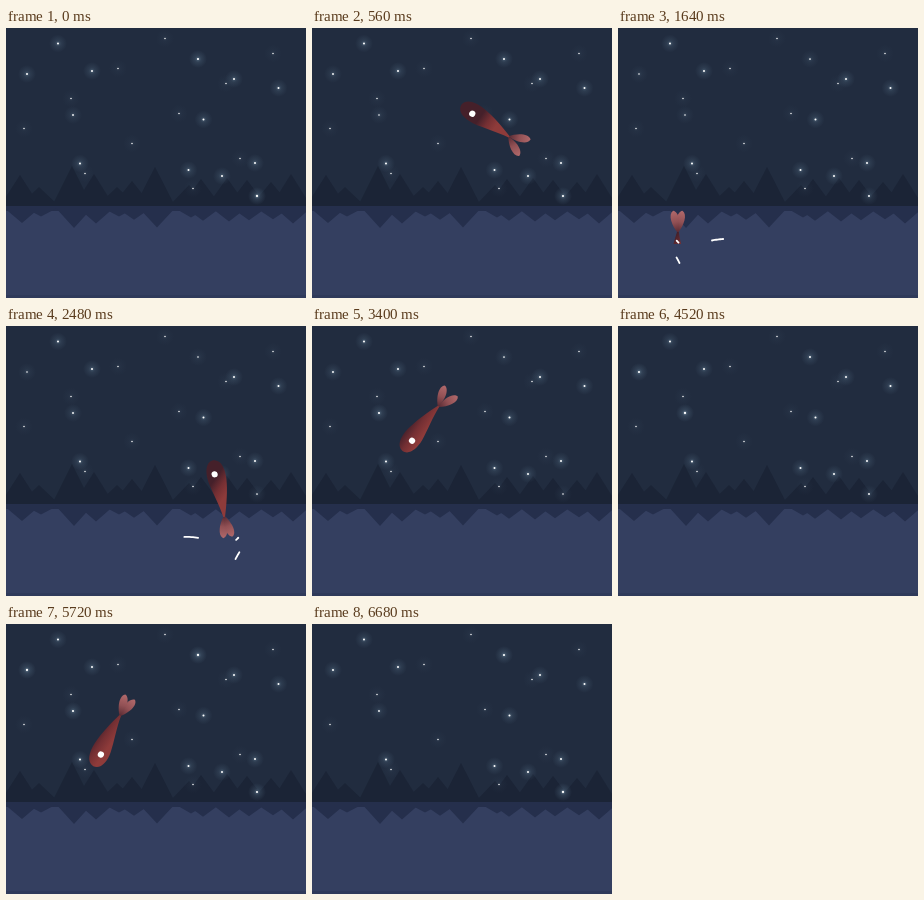
Recreate the animation shown at these times as an HTML page with a canvas. Size 300 by 270 pixels, loop 6.72 s.

```html
<!DOCTYPE html>
<html lang="en">
<head>
<meta charset="utf-8">
<title>Night jump</title>
<style>
html, body { margin: 0; width: 100%; height: 100%; overflow: hidden; background: #212c3f; }
canvas { display: block; }
</style>
</head>
<body>
<canvas id="stage" width="300" height="270"></canvas>
<script>
const ctx = document.getElementById('stage').getContext('2d');
const LOOP = 6720, JUMP = LOOP / 3, HORIZON = 178, WATERLINE = 216, APEX = 859;

const peaks = [[14, 31], [33, 19], [66, 40], [88, 32], [111, 19], [126, 25], [149, 39],
  [183, 21], [195, 27], [221, 28], [241, 26], [265, 24], [285, 32]];
const steady = [[52, 15.5], [74, 135.5], [228, 51], [272.5, 60], [249, 135], [216, 148],
  [197.5, 91.5], [86, 43], [182.5, 142]];
const twinkling = [[67, 87], [21, 46], [192, 31], [251, 168]];

const clamp = v => Math.max(0, Math.min(1, v));

function gradient(x0, y0, x1, y1, ...colors) {
  const g = ctx.createLinearGradient(x0, y0, x1, y1);
  colors.forEach((c, i) => g.addColorStop(i / (colors.length - 1), c));
  return g;
}

// Draws in a shifted, turned and scaled frame
function within(x, y, angle, sx, sy, paint) {
  ctx.save();
  ctx.translate(x, y);
  ctx.rotate(angle);
  ctx.scale(sx, sy);
  paint();
  ctx.restore();
}

function dot(x, y, r, color) {
  ctx.fillStyle = color;
  ctx.beginPath();
  ctx.arc(x, y, r, 0, 7);
  ctx.fill();
}

function hills(color) {
  ctx.fillStyle = color;
  ctx.beginPath();
  for (const [x, h] of peaks) {
    ctx.moveTo(x - 20, 0);
    ctx.lineTo(x, -h);
    ctx.lineTo(x + 20, 0);
  }
  ctx.fill();
}

function star(x, y, glow) {
  const r = 9;
  const g = ctx.createRadialGradient(x, y, 0, x, y, r);
  g.addColorStop(0, `rgba(150,185,205,${glow * .6})`);
  g.addColorStop(.35, `rgba(120,155,180,${glow * .24})`);
  g.addColorStop(1, 'rgba(110,145,170,0)');
  dot(x, y, r, g);
  dot(x, y, .65 + glow * .6, '#fff');
}

function sky(t) {
  ctx.fillStyle = '#212c3f';
  ctx.fillRect(0, 0, 300, HORIZON);
  within(0, HORIZON, 0, 1, 1, () => hills('#1b2436'));
  for (let i = 0; i < 11; i++) star(12 + (147 + 108 * i) % 263, 10.5 + 15 * i, .15);
  steady.forEach(([x, y]) => star(x, y, .6));
  twinkling.forEach(([x, y], i) => {
    const peak = 4500 + 700 * i;
    star(x, y, .55 + .3 * Math.cos(2 * Math.PI * (t - peak) / LOOP));
  });
}

function water() {
  ctx.fillStyle = '#343f60';
  ctx.fillRect(0, HORIZON, 300, 270 - HORIZON);
  ctx.fillStyle = '#252f4c';
  ctx.fillRect(0, HORIZON, 300, 5);
  within(2, HORIZON, 0, 1, -.55, () => hills('#252f4c'));
  ctx.fillStyle = '#2f3a5a';
  ctx.fillRect(0, 267, 300, 3);
}

function fin() {
  ctx.beginPath();
  ctx.moveTo(0, 0);
  ctx.bezierCurveTo(-4.5, 8, -6, 20, 0, 22.5);
  ctx.bezierCurveTo(6, 20, 4.5, 8, 0, 0);
  ctx.fillStyle = gradient(0, 0, 0, 22, '#552831', '#915054', '#b0686a');
  ctx.fill();
}

// Nose up; the back on the right bulges more than the belly
function body(angle) {
  ctx.beginPath();
  ctx.moveTo(0, -35.5);
  ctx.bezierCurveTo(8, -35, 10.5, -25, 9.8, -15);
  ctx.bezierCurveTo(9, -3, 5, 12, 1.8, 22);
  ctx.lineTo(0, 22);
  ctx.bezierCurveTo(-1.5, 10, -6.5, -4, -8.5, -15);
  ctx.bezierCurveTo(-10, -25, -8, -35, 0, -35.5);
  // The shade always falls from the upper left of the scene
  const shade = .6 - angle;
  const dx = Math.cos(shade), dy = Math.sin(shade);
  ctx.fillStyle = gradient(-13 * dx, -13 * dy, 5 * dx, 5 * dy, '#45202a', '#742f33', '#8e3b3a');
  ctx.fill();
  dot(-1, -21.5, 3.1, '#fff');
}

function fish(t) {
  if (t < 60) return;
  const angle = -Math.min(180, 10 + .141 * (t - 240)) * Math.PI / 180;
  const flare = Math.max(0, Math.sin(Math.PI * (t - 240) / 1020));
  const spread = .21 + Math.min(.25, .6 * flare);
  ctx.save();
  ctx.beginPath();
  ctx.rect(0, 0, 300, WATERLINE);
  ctx.clip();
  within(213.5 - .109 * (t - 240), 75.2 + .0002464 * (t - APEX) ** 2, angle, 1, 1, () => {
    for (const side of [1, -1]) within(1, 21, side * spread, 1, 1, fin);
    body(angle);
  });
  ctx.restore();
}

// Part of a quadratic curve between two fractions of its length
function streak(x0, y0, cx, cy, x1, y1, from, to) {
  const at = (a, c, b, k) => a * (1 - k) ** 2 + 2 * c * k * (1 - k) + b * k * k;
  ctx.beginPath();
  for (let i = 0; i <= 8; i++) {
    const k = from + (to - from) * i / 8;
    ctx.lineTo(at(x0, cx, x1, k), at(y0, cy, y1, k));
  }
  ctx.stroke();
}

function splash(x, age, side) {
  const u = age / 320;
  const to = clamp(u * 1.6), from = clamp((u - .2) / .6);
  if (u <= 0 || from >= to) return;
  ctx.strokeStyle = '#fff';
  ctx.lineWidth = 1.8;
  ctx.lineCap = 'round';
  within(x, WATERLINE, 0, side, 1, () => {
    streak(-19, -3.5, -41, -8, -62, 0, from, to);
    streak(13.5, 19, 19, 8, 27, -2, from, to);
    streak(14.5, -1.5, 18, -5, 21.5, -8, from, to);
  });
}

function draw(t) {
  const local = t % JUMP;
  sky(t);
  water();
  fish(local);
  splash(215, local - 160, 1);
  splash(75, local - 1590, -1);
}

const start = performance.now();
function tick() {
  draw((performance.now() - start) % LOOP);
  requestAnimationFrame(tick);
}
tick();
</script>
</body>
</html>
```
